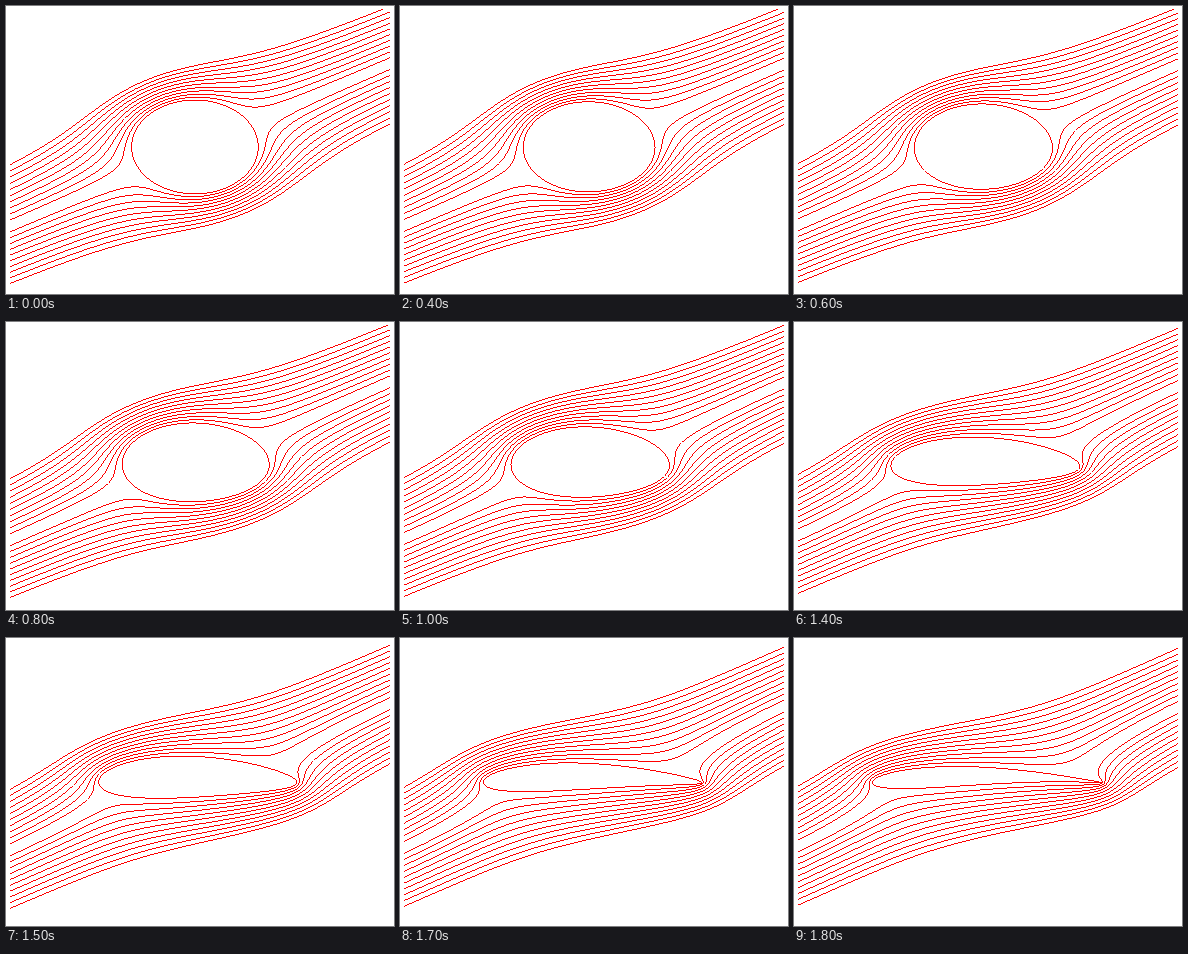
Recreate the animation shown at these times as an HTML page with a canvas. Size 388 by 288 pixels, loop 1.9 s.

```html
<!DOCTYPE html>
<html lang="en">
<head>
<meta charset="utf-8">
<title>Flow around a Joukowski profile</title>
<style>
  html, body { margin: 0; width: 100%; height: 100%; overflow: hidden; background: #fff; }
  canvas { display: block; }
</style>
</head>
<body>
<canvas id="stage" width="388" height="288"></canvas>
<script>
const ctx = document.getElementById('stage').getContext('2d');

const STEP_MS = 100, STEPS = 19;
const ATTACK = Math.PI / 6;
const CENTER = { x: -0.08, y: 0.08 };        // centre of the unit circle
const ORIGIN = { x: 194, y: 144.7 };         // plot origin on the stage
const SCALE = { x: 380 / 6, y: 46.9 };
const PLOT = { left: 4, right: 384, top: 3, bottom: 285 };

// Height of the streamline psi > 0 above the flow axis at position x.
function streamHeight(x, psi) {
  let low = Math.sqrt(Math.max(0, 1 - x * x)), high = psi + 1;
  for (let i = 0; i < 30; i++) {
    const y = (low + high) / 2;
    if (y * (1 - 1 / (x * x + y * y)) < psi) low = y; else high = y;
  }
  return (low + high) / 2;
}

function rotate(x, y) {
  const c = Math.cos(ATTACK), s = Math.sin(ATTACK);
  return { x: x * c - y * s, y: x * s + y * c };
}

function streamline(psi) {
  const points = [];
  for (let i = -250; i <= 250; i++) {
    const x = i / 50;
    points.push(rotate(x, Math.sign(psi) * streamHeight(x, Math.abs(psi))));
  }
  return points;
}

const curves = [];
for (let k = 1; k <= 10; k++) curves.push(streamline(k / 10), streamline(-k / 10));
curves.push(Array.from({ length: 721 }, (_, i) => {
  const a = i * Math.PI / 360;
  return { x: Math.cos(a), y: Math.sin(a) };
}));

// w = z + lambda^2 / z, then to stage coordinates
function project(p, lambda) {
  const x = p.x + CENTER.x, y = p.y + CENTER.y;
  const q = lambda * lambda / (x * x + y * y);
  return {
    x: ORIGIN.x + SCALE.x * x * (1 + q),
    y: ORIGIN.y - SCALE.y * y * (1 - q)
  };
}

function plot(x, y) {
  if (x >= PLOT.left && x < PLOT.right && y >= PLOT.top && y < PLOT.bottom) ctx.fillRect(x, y, 1, 1);
}

// One crisp pixel per column or row, whichever the segment crosses faster.
function drawSegment(a, b) {
  const flat = Math.abs(b.x - a.x) >= Math.abs(b.y - a.y);
  const u = flat ? 'x' : 'y', v = flat ? 'y' : 'x';
  if (a[u] > b[u]) [a, b] = [b, a];
  for (let i = Math.ceil(a[u] - 0.5); i + 0.5 < b[u]; i++) {
    const j = Math.floor(a[v] + (b[v] - a[v]) * (i + 0.5 - a[u]) / (b[u] - a[u]));
    if (flat) plot(i, j); else plot(j, i);
  }
}

function draw(step) {
  ctx.fillStyle = '#fff';
  ctx.fillRect(0, 0, 388, 288);
  ctx.fillStyle = '#f00';
  for (const curve of curves) {
    const points = curve.map(p => project(p, step * 0.05));
    for (let i = 1; i < points.length; i++) drawSegment(points[i - 1], points[i]);
  }
}

let shown = -1;
const start = performance.now();
function tick() {
  const step = Math.floor((performance.now() - start) / STEP_MS) % STEPS;
  if (step !== shown) draw(shown = step);
  requestAnimationFrame(tick);
}
tick();
</script>
</body>
</html>
```
